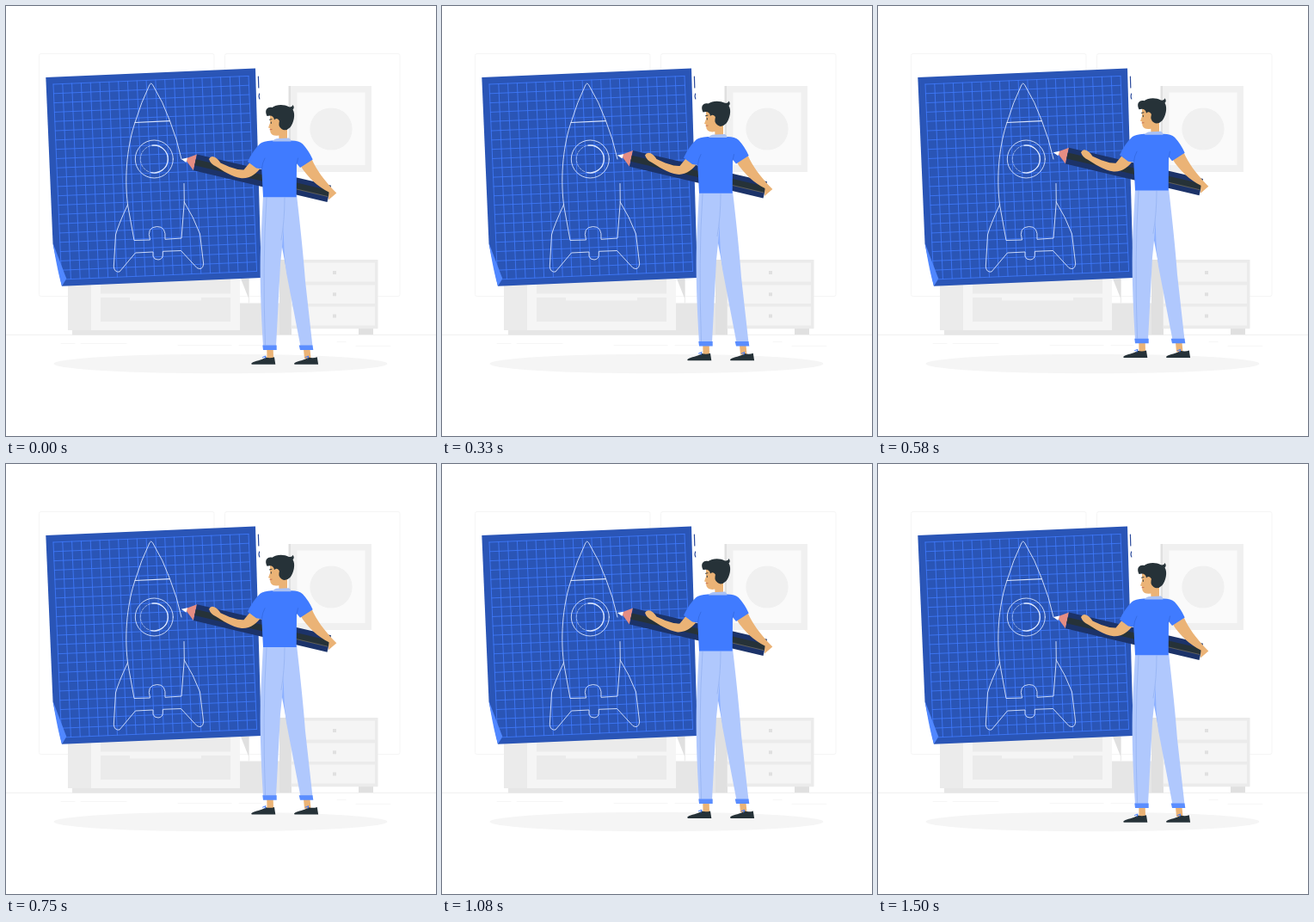
An HTML page that plays this animation: 500 px wide and 500 px high, repeating every 1540 ms.

```html
<!DOCTYPE html>
<html lang="en">
<head>
<meta charset="utf-8">
<title>Rocket blueprint</title>
<style>
  html, body { margin: 0; width: 100%; height: 100%; overflow: hidden; background: #fff; }
  svg { display: block; width: 100%; height: 100%; }
  .line { fill: none; stroke-linecap: round; stroke-linejoin: round; }
  .skin { fill: #ebb376; }
  .ink { fill: #263238; }
</style>
</head>
<body>
<svg viewBox="0 0 500 500">
  <g id="room">
    <g class="line" stroke="#f5f5f5">
      <rect x="38.5" y="55.5" width="203.500" height="282" rx="2"/>
      <rect x="254.500" y="55.500" width="203.500" height="282" rx="2"/>
    </g>
    <path class="line" stroke="#ebebeb" stroke-width=".8" d="M0 382.4H500"/>
    <path class="line" stroke="#f0f0f0" stroke-width=".6" d="M64 392.500H80M87 392.500H140M200 394.500H262M271 394.500H297M385 390.500H395M407 395.400H447"/>

    <path fill="#e0e0e0" d="M328.500 93H334V193H328.500Z"/>
    <path fill="#f0f0f0" d="M331 93H425V193H331Z"/>
    <path fill="#fafafa" d="M338.500 100.500H417.500V185H338.500Z"/>
    <circle cx="378" cy="143" r="24.600" fill="#f0f0f0"/>

    <path fill="#e6e6e6" d="M77 376H332V382.400H77Z"/>
    <path fill="#ebebeb" d="M72 310H99V377H72Z"/>
    <path fill="#f5f5f5" d="M99 310H272V377H99Z"/>
    <path fill="#ebebeb" d="M110 315H261V334.500H110ZM110 339H261V367H110Z"/>
    <path fill="#f5f5f5" d="M144 339H227V342.500H144Z"/>
    <path fill="#e6e6e6" d="M272 345.500H320V382H272Z"/>
    <path fill="#e0e0e0" d="M273 317H282.500V341Z"/>
    <path class="line" stroke="#ebebeb" d="M282.500 317V345"/>

    <path fill="#e0e0e0" d="M318 295H332V382H318ZM410 375H427V382H410Z"/>
    <path fill="#ebebeb" d="M331.500 295H432.500V375.300H331.500Z"/>
    <path fill="#f5f5f5" d="M332 298.500H429V320.500H332ZM332 324.500H429V346H332ZM332 349.500H429V371.500H332Z"/>
    <path fill="#e0e0e0" d="M380 308H384V312H380ZM380 333.300H384V337.300H380ZM380 358.600H384V362.600H380Z"/>
  </g>

  <ellipse cx="249.500" cy="416" rx="194" ry="11.300" fill="#f5f5f5"/>

  <g id="board">
    <path fill="#2a55b6" d="M46.300 83 290 72.400 297 316 65 325.800 54.500 276Z"/>
    <path id="grid" class="line" stroke="#407bff" stroke-width=".8"/>
    <path fill="#5087ff" d="M54.500 275.500 70.300 317 65 325.800Q60 309 54.500 275.500Z"/>
    <path class="line" stroke="#2a4a9c" stroke-width="1.200" d="M293.400 82 293.800 95M294.600 102Q293.400 105 294.800 108"/>
    <g class="line" stroke="#dce7ff" stroke-width=".9">
      <path d="M141.500 231C137 195 142 159 150 135.500Q157 112 167 91.500Q168.700 88.500 170.500 91.500Q183 112 190.500 133.500Q199 155 204 178M207 206.500 207.300 228"/>
      <path d="M150 135.500 190.500 133.700" stroke-width="1.200"/>
      <circle cx="172.300" cy="178" r="22"/>
      <circle cx="172.300" cy="178" r="16" stroke-width=".6" stroke-dasharray="3 1.500"/>
      <path d="M170 162.200A16 16 0 1 1 169 193.700" stroke-width="1.300"/>
      <path d="M141.500 231 149 272.500 167.500 272Q163 257 175.500 256.500Q186.500 256 185 271.300L204 270 207.300 228"/>
      <path d="M141.500 231Q130 256 127.500 266L125.300 303Q126 310 132 309L150.500 287 171 286V291Q172 295 177 295Q182 294.500 182.300 290V285.300L203.500 284.500 222 304.500Q228.500 308 229.700 300L225.500 265Q218 245 207.300 228"/>
    </g>
  </g>

  <g id="man">
    <path fill="#e58d83" d="M208 177.800 222 172.500 218 191.300Z"/>
    <path fill="#fff" d="M203.800 178 211 176.600 209.500 182Z"/>
    <path fill="#1c3369" d="M222 172.500 378 208.700 373.500 228 218 191.300Z"/>
    <path class="ink" d="M220.800 178.300 376.600 214.500 375 221.500 219.300 185.300Z"/>
    <path class="line" stroke="#8a7c5c" stroke-width=".6" d="M338 213 374 221.500"/>

    <path class="skin" d="M236 178Q238 174 242 175.500Q246 177 249.500 182.500C259 187 269 191 276.500 190.500L286 179 297 187C292 194 284 201 274 200.300C263 199 251 191 244 186.500Q238 184 236 178Z"/>
    <path class="skin" d="M342 185 355.500 178C361 191 371 203 378 211L384.300 217.500 375 225.500 375.500 216.500C363 210 351 200 342 185Z"/>

    <path class="skin" d="M303.300 399H310.700L311 410H303.500ZM346 399H353.500L354.500 410H347Z"/>
    <g id="shoe">
      <path class="ink" d="M285.300 415.500C290 412 297 412.500 302 408.500Q307 410 312 408.300L313.300 416.800H286Q285 416.500 285.300 415.500Z"/>
      <path class="line" stroke="#407bff" stroke-width="1" d="M298.500 408.500 302 407 301 410"/>
    </g>
    <use href="#shoe" transform="translate(49.800 0) scale(1)" x="0"/>

    <path fill="#8cb0ff" d="M318 240H327V312L319 270Z"/>
    <path fill="#b0c8fd" d="M299 220H325Q323 265 319 300L314 396H299C296 350 295 310 296 280Z"/>
    <path fill="#b0c8fd" d="M324 220H338Q345 280 348 320L356.500 396H342.500L326 310Q321 275 324 220Z"/>
    <path class="line" stroke="#8cacee" stroke-width=".6" d="M303 223Q298 300 301.500 394M324 223Q324 250 320 272"/>
    <path fill="#5a8dff" d="M298.300 394.500H314.700V400H299ZM340.700 394.500H356.500L357.300 400H342Z"/>

    <path class="skin" d="M318 140H327V158H317.500L317.300 150.500Q310 152 307.500 147L306.800 142 305 141.500 307 136V127H322Z"/>
    <path class="ink" d="M303.500 128C300 121 304 116.500 309.500 118C314 114.500 323 114 329 117.300Q333 118 333.500 115Q336 118 333.500 120.500C337 126 334.500 136 330.500 141Q325 146.500 320.500 143Q316 140 317.500 133Q315 129.500 312 132.500Q311 126 303.500 128Z"/>
    <path class="skin" d="M317.800 133.500Q313 130 312.200 134.500Q312.500 139 317 139Z"/>
    <path class="line" stroke="#263238" stroke-width=".9" d="M306.500 132.200 309 131.600M308.300 135V136.500"/>
    <path class="line" stroke="#c46a52" stroke-width=".9" d="M307 143.700 309 143.500"/>

    <path fill="#407bff" d="M309 156.500H331.500Q341 156.500 345 160.500Q352 168 356.700 178.500L342 188 338 183 337.700 222.300H299L297.300 189.500 291 188.500 281 181Q287 168 295.500 160Q299 157 309 156.500Z"/>
    <path class="line" stroke="#2e62d6" stroke-width=".6" d="M297.300 190Q298 182 301 177M338 184 339.500 177"/>
    <path fill="#a9c1f4" d="M310 157.500Q312 153.500 318 154L329 153.500Q331.500 155 331.500 157.500Z"/>
  </g>
</svg>
<script>
const LOOP = 1540, FRAME = 1000 / 24, PERIOD = 1500, RISE = 10, LEAD = 25;
const man = document.getElementById("man");

// The grid is a sheared square of 21 cells.
const CELLS = 21, SIDE = 227, TILT = 9.6;
const gridPoint = (u, v) => `${55 + SIDE * u + TILT * v} ${91 - TILT * u + SIDE * v}`;
let lines = "";
for (let i = 0; i <= CELLS; i++) {
  const k = i / CELLS;
  lines += `M${gridPoint(k, 0)}L${gridPoint(k, 1)}M${gridPoint(0, k)}L${gridPoint(1, k)}`;
}
document.getElementById("grid").setAttribute("d", lines);

// Linear float up and back down.
function lift(ms) {
  const phase = ((ms + LEAD) / PERIOD) % 1;
  return RISE * (1 - Math.abs(1 - 2 * phase));
}

function draw() {
  const step = Math.floor((performance.now() % LOOP + 5) / FRAME);
  man.setAttribute("transform", `translate(0 ${lift(0) - lift(step * FRAME)})`);
  requestAnimationFrame(draw);
}
draw();
</script>
</body>
</html>
```
